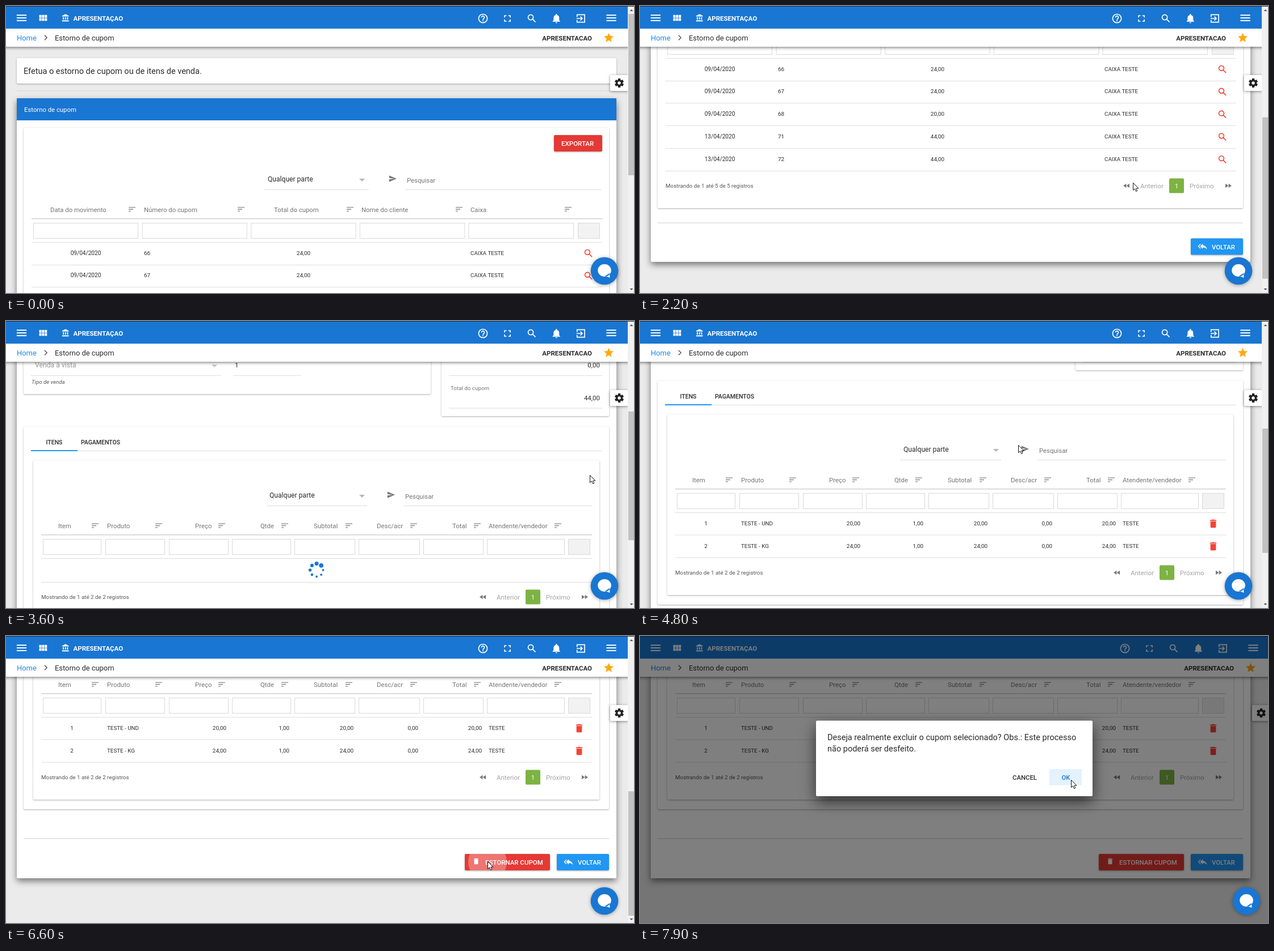
Recreate the animation shown at these times as an HTML page with a canvas. Size 1106x507 px, loop 8 s.

```html
<!DOCTYPE html>
<html lang="pt-BR">
<head>
<meta charset="utf-8">
<title>Estorno de cupom</title>
<style>
html, body { margin: 0; width: 100%; height: 100%; overflow: hidden; background: #ebebeb; }
canvas { display: block; width: 1106px; height: 507px; }
</style>
</head>
<body>
<canvas id="stage" width="1106" height="507"></canvas>
<script>
const W = 1106, H = 507, LOOP = 8000, NOTCH = 81.25;
const ctx = document.getElementById('stage').getContext('2d');
const BLUE = '#1976d2', RED = '#e53935', LINE = '#dedede', DARK = '#2b2b2b', GRAY = '#757575';

// 24-unit icons: fill paths, and line paths drawn with a 2-unit stroke
const solid = {
  menu: 'M3 6h18v2H3zM3 11h18v2H3zM3 16h18v2H3z',
  grid: 'M4 5h5v6H4zM10 5h5v6h-5zM16 5h5v6h-5zM4 12h5v6H4zM10 12h5v6h-5zM16 12h5v6h-5z',
  bank: 'M4 10h3v7H4zM10 10h3v7h-3zM16 10h3v7h-3zM2 19h19v3H2zM11.5 1L2 6v2h19V6z',
  bell: 'M10 20h4a2 2 0 0 1-4 0zM18 16v-5q0-5-4.5-6.3V4a1.5 1.5 0 0 0-3 0v.7Q6 6 6 11v5l-2 2v1h16v-1z',
  star: 'M12 17.3L18.2 21l-1.7-7L22 9.2l-7.2-.6L12 2 9.2 8.6 2 9.2 7.5 14 5.8 21z',
  send: 'M2 21L23 12 2 3v7l15 2-15 2z',
  sort: 'M3 6h18v2H3zM3 11h12v2H3zM3 16h6v2H3z',
  rewind: 'M11 18V6l-8.5 6zM11.5 12l8.5 6V6z',
  forward: 'M4 18l8.5-6L4 6zM13 6v12l8.5-6z',
  trash: 'M6 7h12v12a2 2 0 0 1-2 2H8a2 2 0 0 1-2-2zM5 4h3.5l1-1h5l1 1H19v2H5z',
  replyAll: 'M7 8V5l-7 7 7 7v-3l-4-4zM13 9V5l-7 7 7 7v-4.1c5 0 8.5 1.6 11 5.1-1-5-4-10-11-11z'
};
const lines = {
  help: 'M12 3a9 9 0 1 0 .01 0zM9 10a3 3 0 1 1 5 2q-2 1.5-2 3M12 16v2',
  search: 'M9.5 4a5.5 5.5 0 1 0 .01 0zM13.6 13.6l6 6',
  exit: 'M4 9V4h16v16H4v-5M3 12h12M11 8l4 4-4 4',
  full: 'M6 10V6h4M14 6h4v4M18 14v4h-4M10 18H6v-4',
  chevron: 'M9 6l6 6-6 6'
};
const arrow = new Path2D('M0 0V13L3 10.3 5 15 7.3 14 5.3 9.6H9.4Z');

function icon(name, x, y, size, color) {
  const path = new Path2D(solid[name] || lines[name]);
  ctx.save();
  ctx.translate(x - size / 2, y - size / 2);
  ctx.scale(size / 24, size / 24);
  ctx.fillStyle = ctx.strokeStyle = color;
  ctx.lineWidth = 2;
  if (solid[name]) ctx.fill(path); else ctx.stroke(path);
  ctx.restore();
}

// y is the middle of the capitals
function text(str, x, y, size = 11.34, color = DARK, font = '400', align = 'left') {
  ctx.font = `${font} ${size}px Roboto, Arial, sans-serif`;
  ctx.fillStyle = color;
  ctx.textAlign = align;
  ctx.fillText(str, x, y + size * 0.36);
}

function rect(x1, y1, x2, y2, color) {
  ctx.fillStyle = color;
  ctx.fillRect(x1, y1, x2 - x1, y2 - y1);
}

const rule = (x1, x2, y, h = 1, color = LINE) => rect(x1, y, x2, y + h, color);

function card(x1, y1, x2, y2, color = '#fff', blur = 3, drop = 1, shade = 0.32, r = 2) {
  ctx.save();
  ctx.shadowColor = `rgba(0,0,0,${shade})`;
  ctx.shadowBlur = blur;
  ctx.shadowOffsetY = drop;
  ctx.fillStyle = color;
  ctx.beginPath();
  ctx.roundRect(x1, y1, x2 - x1, y2 - y1, r);
  ctx.fill();
  ctx.restore();
}

function disc(x, y, r, color) {
  ctx.fillStyle = color;
  ctx.beginPath();
  ctx.arc(x, y, r, 0, 7);
  ctx.fill();
}

function caret(x, y, color) {
  ctx.fillStyle = color;
  ctx.beginPath();
  ctx.moveTo(x - 5, y - 2);
  ctx.lineTo(x + 5, y - 2);
  ctx.lineTo(x, y + 3);
  ctx.fill();
}

function input(x1, x2, y, fill = '#fff') {
  rect(x1, y, x2, y + 28, '#d9d9d9');
  rect(x1 + 1, y + 1, x2 - 1, y + 27, fill);
}

function searchBar(x1, x2, sx, px, pr, y) {
  text('Qualquer parte', x1 + 6, y, 12.1);
  caret((x1 + x2) / 2 + 80, y + 1, '#b5b5b5');
  rule(x1, x2, y + 18);
  icon('send', sx, y - 1, 15, GRAY);
  text('Pesquisar', px + 3, y + 2, 11.34, GRAY);
  rule(px, pr, y + 18);
}

function pager(y, dx, left, count) {
  text(`Mostrando de 1 até ${count} de ${count} registros`, left, y, 9.8, '#555');
  icon('rewind', 857 + dx, y, 15, '#777');
  text('Anterior', 881 + dx, y, 11.5, '#a3a3a3');
  card(932 + dx, y - 13, 958 + dx, y + 13, '#7cb342', 0, 0, 0, 2);
  text('1', 945 + dx, y, 11.34, '#fff', '400', 'center');
  text('Próximo', 968 + dx, y, 11.5, '#a3a3a3');
  icon('forward', 1036 + dx, y, 15, '#777');
}

function backButton(y) {
  card(970, y, 1062, y + 29, '#2196f3');
  icon('replyAll', 990.5, y + 14, 16, '#fff');
  text('VOLTAR', 1007, y + 15, 11.34, '#fff', '500');
}

function listPage(pressed) {
  card(19, 92, 1075, 137);
  text('Efetua o estorno de cupom ou de itens de venda.', 31, 115, 14.5);
  rule(19, 1075, 149.5, 1, '#d6d6d6');
  card(19, 163, 1075, 777, '#fff', 12, 5, 0.5);
  rect(19, 163, 1075, 202, BLUE);
  text('Estorno de cupom', 32, 183, 11.34, '#fff');
  card(31, 215, 1062, 682);
  card(965, 228, 1050, 257, RED);
  text('EXPORTAR', 978, 242.5, 11.5, '#fff', '500');
  searchBar(455, 639, 681, 703, 1048, 306);

  const heads = [['Data do movimento', 78], ['Número do cupom', 243], ['Total do cupom', 472], ['Nome do cliente', 626], ['Caixa', 818]];
  heads.forEach(([name, x], i) => {
    text(name, x, 360, 11.34, GRAY);
    icon('sort', 222 + i * 192, 359, 16, '#888');
    input(48 + i * 191.6, 233 + i * 191.8, 383);
  });
  input(1007, 1046, 383, '#f2f2f2');
  rule(45, 1050, 375, 1.5, '#d2d2d2');
  rule(45, 1050, 417);

  const rows = [['09', 66, '24,00'], ['09', 67, '24,00'], ['09', 68, '20,00'], ['13', 71, '44,00'], ['13', 72, '44,00']];
  rows.forEach(([day, num, total], i) => {
    const y = 436 + i * 39.8;
    text(day + '/04/2020', 140.5, y, 10.1, DARK, '400', 'center');
    text(num, 243, y, 9.9);
    text(total, 536, y, 9.9, DARK, '400', 'right');
    text('CAIXA TESTE', 818, y, 9.8);
    if (pressed && i === 4) disc(1026, y + 1, 13, 'rgba(0,0,0,.1)');
    icon('search', 1026, y + 1, 19.4, '#f44336');
    rule(45, 1050, Math.round(y + 20.5));
  });
  pager(642.5, 0, 45, 5);
  rule(31, 1062, 707.5, 1.5);
  backButton(735.5);
}

function spinner(x, y, step) {
  for (let i = 0; i < 8; i++) {
    const a = (step - 1 - i) * Math.PI / 4;
    disc(x + 11.5 * Math.cos(a), y + 11.5 * Math.sin(a), 3.9 - Math.min(i, 5) * 0.4, BLUE);
  }
}

function detailPage(t, loading) {
  const up = loading ? 38 : 0;
  card(19, 163, 1075, 1029 - up, '#fff', 12, 5, 0.5);
  card(31, 215, 748, 454);
  card(767, 215, 1062, 493);
  text('Venda à vista', 51, 403, 12.2, '#9a9a9a');
  caret(367, 404, '#c8c8c8');
  rule(44, 379, 421);
  text('Tipo de venda', 45, 433, 9.7, '#555', 'italic 400');
  text('1', 403, 403, 11.5);
  rule(400, 520, 421);
  text('0,00', 1046, 403, 11.5, DARK, '400', 'right');
  rule(780, 1050, 421);
  text('Total do cupom', 783, 443, 9.8, GRAY);
  text('44,00', 1046, 461, 11.5, DARK, '400', 'right');
  rule(780, 1050, 478.5);

  card(31, 512, 1062, 907 - up);
  text('ITENS', 70.5, 539, 10.5, DARK, '500');
  text('PAGAMENTOS', 132, 539, 10.5, DARK, '500');
  rule(44, 1050, 554);
  rule(44, 126, 553, 2, '#2196f3');
  card(48, 571, 1045, 890 - up);
  searchBar(458, 636, 678, 700, 1032, 633);

  const cols = [['Item', 92, 157, 65, 168], ['Produto', 178, 269, 175, 280], ['Preço', 333, 380, 287, 392],
    ['Qtde', 448, 491, 398, 502], ['Subtotal', 542, 604, 508, 615], ['Desc/acr', 653, 718, 621, 729],
    ['Total', 786, 830, 735, 841], ['Atendente/vendedor', 850, 972, 847, 984]];
  for (const [name, x, sx, x1, x2] of cols) {
    text(name, x, 687, 11.4, GRAY);
    icon('sort', sx, 686.5, 16, '#888');
    input(x1, x2, 710);
  }
  input(990, 1029, 710, '#f2f2f2');
  rule(62, 1032, 702, 1.5, '#d2d2d2');
  rule(62, 1032, 744);

  if (loading) {
    spinner(547, 765, Math.floor((t - 3600) / 100));
    rule(62, 1032, 786);
  } else {
    const rows = [['UND', '20,00'], ['KG', '24,00']];
    rows.forEach(([unit, price], i) => {
      const y = 763 + i * 40;
      text(i + 1, 116, y, 9.9, DARK, '400', 'center');
      text('TESTE - ' + unit, 178, y, 9.8);
      [[388, price], [499, '1,00'], [612, price], [726, '0,00'], [838, price]]
        .forEach(([x, v]) => text(v, x, y, 9.9, DARK, '400', 'right'));
      text('TESTE', 850, y, 9.8);
      icon('trash', 1009.5, y + 1, 19.4, '#f44336');
      rule(62, 1032, y + 20.5);
    });
  }
  pager(850.5 - up, -17, 62, 2);
  rule(31, 1062, 958 - up, 1.5);
  card(808, 986 - up, 958, 1015 - up, RED);
  if (t >= 6600 && t < 7000) {
    ctx.save();
    ctx.beginPath();
    ctx.rect(808, 986, 150, 29);
    ctx.clip();
    disc(848, 1000, 102 * Math.min(1, (t - 6500) / 300), `rgba(255,255,255,${t < 6900 ? 0.3 : 0.12})`);
    ctx.restore();
  }
  icon('trash', 828, 999 - up, 14, '#fff');
  text('ESTORNAR CUPOM', 844, 1000.5 - up, 11.5, '#fff', '500');
  backButton(986 - up);
}

function chrome(dx) {
  card(-10, 30, W + 10, 72, '#fff', 5, 2, 0.45, 0);
  rect(0, 0, W, 40, BLUE);
  rect(0, 0, W, 1, '#1d3145');
  icon('menu', 27.5, 21, 23, '#fff');
  icon('grid', 65, 21.5, 19.4, '#fff');
  icon('bank', 105, 21, 14.8, '#fff');
  text('APRESENTAÇAO', 118.5, 21.5, 11.5, '#fff', '700');
  ['help', 'full', 'search', 'bell', 'exit'].forEach((n, i) => icon(n, 840 + i * 43.1 + dx, 22, 20, '#fff'));
  icon('menu', 1066 + dx, 21, 23, '#fff');
  text('Home', 19, 56, 12.95, '#1e88e5');
  icon('chevron', 70, 56, 17, '#555');
  text('Estorno de cupom', 86, 56, 12.9);
  text('APRESENTACAO', 1032 + dx, 56.5, 11.5, DARK, '700', 'right');
  icon('star', 1061.5 + dx, 56, 20.5, '#ffa80f');
  card(1064 + dx, 122, 1096 + dx, 150, '#fff', 5, 1, 0.45);
  gear(1080 + dx, 136);
}

function gear(x, y) {
  ctx.save();
  ctx.translate(x, y);
  ctx.fillStyle = '#222';
  for (let i = 0; i < 6; i++) {
    ctx.fillRect(-2.2, -8, 4.4, 5);
    ctx.rotate(Math.PI / 3);
  }
  ctx.restore();
  ctx.lineWidth = 3.2;
  ctx.strokeStyle = '#222';
  ctx.beginPath();
  ctx.arc(x, y, 4.4, 0, 7);
  ctx.stroke();
}

function scrollbar(scroll, height) {
  rect(1095, 1, W, H, '#f1f1f1');
  const top = 14 + scroll / height * 480;
  rect(1096, top, W, top + H / height * 480, '#c1c1c1');
  ctx.fillStyle = '#505050';
  for (const [y, d] of [[9, -3], [499, 3]]) {
    ctx.beginPath();
    ctx.moveTo(1098.5, y);
    ctx.lineTo(1104.5, y);
    ctx.lineTo(1101.5, y + d);
    ctx.fill();
  }
}

function chat(x, y) {
  ctx.save();
  ctx.shadowColor = 'rgba(0,0,0,.35)';
  ctx.shadowBlur = 6;
  ctx.shadowOffsetY = 1;
  disc(x, y, 24.3, BLUE);
  ctx.restore();
  ctx.fillStyle = '#fff';
  ctx.beginPath();
  ctx.ellipse(x, y - 1, 11.8, 11, 0, 0, 7);
  ctx.moveTo(x + 1, y + 9);
  ctx.lineTo(x + 9.5, y + 12);
  ctx.lineTo(x + 9, y + 4);
  ctx.fill();
}

function dialog(scale, alpha) {
  ctx.save();
  ctx.globalAlpha = alpha;
  ctx.translate(553.5, 216);
  ctx.scale(scale, scale);
  ctx.translate(-553.5, -216.5);
  card(310, 150, 797, 283.5, '#fff', 26, 10, 0.6);
  text('Deseja realmente excluir o cupom selecionado? Obs.: Este processo', 330, 179, 14.5);
  text('não poderá ser desfeito.', 330, 199, 14.5);
  text('CANCEL', 656, 250, 11.34, DARK, '500');
  rect(721, 235.5, 778, 264, '#e3f2fd');
  text('OK', 750, 250, 11.34, BLUE, '500', 'center');
  ctx.restore();
}

const route = [[200, 640, 500], [500, 656, 272], [1600, 656, 272], [2200, 868, 312], [2500, 1025, 294], [2600, 1030, 288],
  [2700, 1030, 288], [3000, 1028, 272], [4100, 1028, 272], [4600, 666, 219], [5600, 666, 219], [5800, 660, 290],
  [6000, 756, 389], [6100, 756, 389], [6500, 848, 398], [7000, 848, 398], [7700, 750, 264], [7900, 759, 254]];

function pointer(t) {
  if (t < route[0][0]) return;
  const i = route.findIndex(k => k[0] >= t);
  const b = route[i], a = route[Math.max(0, i - 1)];
  const p = b[0] > a[0] ? (t - a[0]) / (b[0] - a[0]) : 1;
  ctx.save();
  ctx.translate(a[1] + (b[1] - a[1]) * p + 0.5, a[2] + (b[2] - a[2]) * p + 0.5);
  ctx.fillStyle = '#fff';
  ctx.strokeStyle = '#111';
  ctx.lineWidth = 1;
  ctx.fill(arrow);
  ctx.stroke(arrow);
  ctx.restore();
}

const passed = (t, times) => times.filter(x => x <= t).length;

function draw(t) {
  const detail = t >= 3600, loading = detail && t < 3900;
  const wait = t >= 3400 && !detail, modal = t >= 6700;
  const scroll = NOTCH * passed(t, [900, 1000, 1300, 1500]) + Math.min(276, NOTCH * passed(t, [4800, 4900, 5100, 5400]));
  const dx = wait || modal ? 14 : 0;

  rect(0, 0, W, H, '#ebebeb');
  ctx.save();
  ctx.translate(0, -Math.round(scroll));
  if (detail) detailPage(t, loading); else listPage(wait);
  ctx.restore();
  chrome(dx);

  if (wait) rect(0, 0, W, H, `rgba(0,0,0,${t < 3500 ? 0.1 : 0.3})`);
  if (modal) {
    const p = Math.min(1, 0.15 + (t - 6700) / 240);
    rect(0, 0, W, H, `rgba(0,0,0,${0.5 * Math.min(1, p * 1.55)})`);
    dialog(0.8 + 0.2 * p, p);
  }
  if (!dx) scrollbar(scroll, detail ? (loading ? 1070 : 1108) : 854);
  chat(1054 + dx, 468);
  pointer(t);
}

const start = performance.now();
function frame() {
  const t = (performance.now() - start) % LOOP;
  draw(Math.floor(t / 100) * 100);
  requestAnimationFrame(frame);
}
frame();
</script>
</body>
</html>
```
